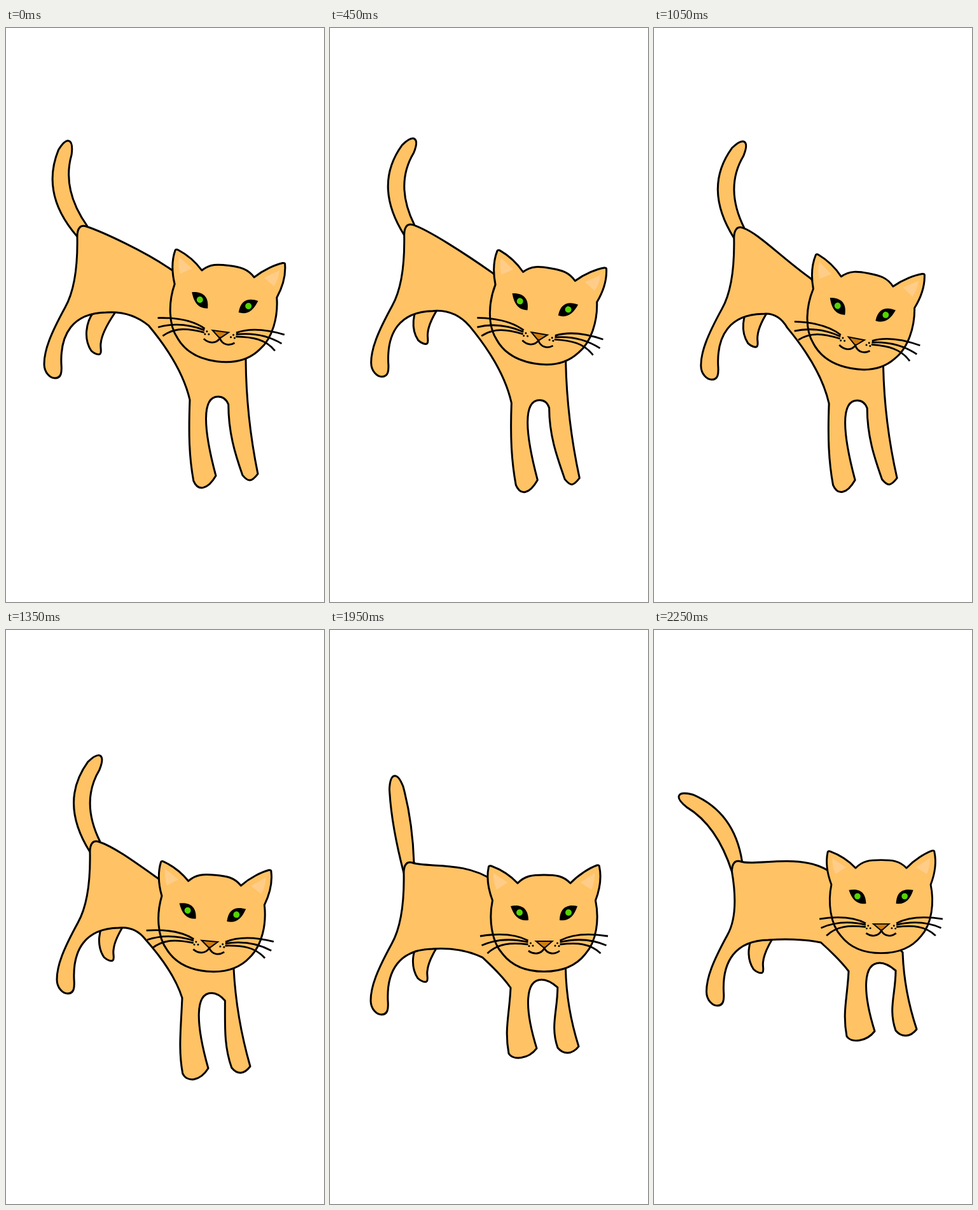
Write an HTML page that moves like this. It is 500 by 900 pixels and loops after 8 s.

```html
<!DOCTYPE html>
<html lang="en">
<head>
<meta charset="utf-8">
<title>Cat</title>
<style>
  html, body { margin: 0; width: 100%; height: 100%; overflow: hidden; background: #fff; }
  svg { display: block; width: 100%; height: 100%; }
  .fur { fill: #ffc264; stroke: #000; stroke-width: 3; stroke-linejoin: round; }
  .line { fill: none; stroke: #000; stroke-width: 2.8; }
</style>
</head>
<body>
<svg viewBox="0 0 500 900">
  <defs>
    <g id="side">
      <path d="M79.5-62L57-47 74.5-36Q80-48 79.5-62Z" fill="#ffcd88"/>
      <path d="M52.5-10C38-13 25-9 24.500 12C39 14 47 6 52.500-10Z"/>
      <circle cx="38.500" cy="0" r="5" fill="#55d400"/>
      <circle cx="21" cy="48" r="1.500"/>
      <circle cx="17.500" cy="52" r="1.500"/>
      <circle cx="23.500" cy="52.500" r="1.500"/>
      <path class="line" d="M25 44C48 32 75 33 100.500 37M25 46.500C52 40 76 42 98 51.500M25 50C52 47 72 48 89 64"/>
    </g>
  </defs>
  <g id="cat">
    <path id="tail" class="fur"/>
    <path id="farLeg" class="fur" d="M138 445C125 462 122 488 134 506C139 511 146 513 148 511C151 508 148 502 149 495C150 482 158 466 171 447L171 430 150 430Z"/>
    <path id="body" class="fur"/>
    <g id="head">
      <path class="fur" d="M-81-19C-89-40-90-58-87-72Q-86-74-83-73C-72-69-55-60-41.500-46C-30-58-18-59 0-59C18-59 30-58 41.500-46C55-60 72-70 83-74Q87-75 87-72C90-58 89-40 81-19C87 10 83 45 65 65C50 84 28 92.500 0 92.500C-28 92.500-50 84-65 65C-83 45-87 10-81-19Z"/>
      <use href="#side"/>
      <use href="#side" transform="scale(-1 1)"/>
      <path d="M-12.500 45H13L.5 56Z" fill="#d07c0c" stroke="#000" stroke-width="2"/>
      <path class="line" d="M-24.500 60C-16 66-5 66 .5 56C6 66 17 66 24.500 60"/>
    </g>
  </g>
</svg>
<script>
const LOOP = 8000, STEP = 150;

// hip: shift of the hindquarters; chest: front of the armpit; head: point between the eyes;
// turn and sway in degrees; curl: sideways bow of the tail; sit: sinking of the rump
const POSES = [
  { step: 0, ease: 1, hip: [0, 0], chest: [289, 583], head: [343, 431], turn: 7.5, sway: 12.5, curl: 35, sit: 0 },
  { step: 2, ease: 1, hip: [2, 1], chest: [291, 584], head: [341, 431], turn: 7.5, sway: 1, curl: 39, sit: 0 },
  { step: 5, ease: 1, hip: [10, -9], chest: [274, 596], head: [328, 442.5], turn: 14.2, sway: 1, curl: 39, sit: 0 },
  { step: 9, ease: 1.4, hip: [20, 21], chest: [277, 577], head: [324, 443], turn: 5, sway: 1, curl: 39, sit: 0 },
  { step: 11, ease: 1, hip: [10, 35], chest: [276, 571], head: [334.5, 445], turn: 4, sway: 5, curl: 41, sit: 0 },
  { step: 13, ease: 1, hip: [4, 54], chest: [284, 561], head: [336.5, 443], turn: 0, sway: 9, curl: 0, sit: 0 },
  { step: 15, ease: .36, hip: [22.5, 40], chest: [306, 535], head: [357, 417.5], turn: 0, sway: 36, curl: -29, sit: 12 }
];
const LAST = POSES[POSES.length - 1].step;

const el = id => document.getElementById(id);
const shape = (id, d) => el(id).setAttribute('d', d);
const place = (id, transform) => el(id).setAttribute('transform', transform);
const mix = (a, b, k) => Array.isArray(a) ? a.map((v, i) => mix(v, b[i], k)) : a + (b - a) * k;
const smooth = k => k * k * (3 - 2 * k);
// Moves a point along a unit direction and to the right of it
const walk = ([x, y], [dx, dy], along, right) => [x + dx * along - dy * right, y + dy * along + dx * right];
const shifter = (dx, dy) => (...p) => p.map((v, i) => v + (i % 2 ? dy : dx));

function poseAt(step) {
  const i = Math.max(1, POSES.findIndex(p => p.step >= step));
  const a = POSES[i - 1], b = POSES[i];
  const k = ((step - a.step) / (b.step - a.step)) ** b.ease;
  return Object.fromEntries(Object.keys(a).map(key => [key, mix(a[key], b[key], k)]));
}

function tailPath({ hip: [x, y], sit, sway, curl }) {
  const rump = shifter(x - sit, y + sit);
  const angle = sway * Math.PI / 180, up = [-Math.sin(angle), -Math.cos(angle)];
  const root = rump(120, 318);
  const bend = walk(root, up, 70, -curl), end = walk(root, up, 126, 0);
  const length = Math.hypot(end[0] - bend[0], end[1] - bend[1]);
  const tip = end.map((v, i) => (v - bend[i]) / length);
  return [
    'M', rump(112, 327), 'Q', walk(bend, up, 0, -17), walk(end, tip, 0, -11),
    'Q', walk(end, tip, 19, -7), walk(end, tip, 19, 0),
    'Q', walk(end, tip, 19, 7), walk(end, tip, 0, 11),
    'Q', walk(bend, up, 0, 17), rump(128, 311)
  ].join(' ');
}

function bodyPath({ hip: [hx, hy], chest: [ax, ay], head, sit }) {
  const hind = shifter(hx, hy), rump = shifter(hx - sit, hy + sit);
  const chest = shifter(ax, ay), face = shifter(...head);
  // 0: standing level, 1: front stretched far down
  const stretch = smooth(Math.min(1, Math.max(0, (ay - hy - 495) / 110)));
  const leg = 94 + 28 * stretch;
  const width = 33 - 11 * stretch ** 2;
  const fold = 45 + 80 * stretch;
  const pad = 18 + 6 * stretch;
  const left = shifter(ax + 41, ay + leg), right = shifter(ax + 107, ay + leg - 3);
  const gap = shifter(ax + 49 - 5 * stretch, ay - 13 + 9 * stretch);
  const [sx, sy] = face(34, 88), [rx, ry] = right(0, 0);
  const [gx, gy] = gap(0, 0), [ix, iy] = gap(width - 8, 12);
  const [vx, vy] = chest(-30 - .3 * fold, -fold);
  return [
    'M', rump(112, 327), 'C', rump(112, 314, 117, 308, 126, 311),
    'C', rump(150, 319), face(-124, sit - 81, -80, sit - 50), 'L', sx, sy,
    'Q', (sx + rx) / 2 - 9, (sy + ry) / 2, rx, ry,
    // right front leg
    'C', right(-10, 13, 9 - width, 13, -width, 2),
    'C', right(-width - 12, -32), ix, mix(iy, ry, .4), ix, iy,
    'Q', gap(11, 0, 0, 0),
    // left front leg
    'C', gap(-26, 0), left(-20, .6 * (gy - ay - leg), 0, 0),
    'C', left(-13, pad - 1, -width - 4, pad + 1, -width - 11, 8),
    'C', left(-width - 18, -30), chest(-2, .45 * leg, 0, 0),
    // belly and hind leg
    'Q', (ax + vx) / 2 + .17 * fold, (ay + vy) / 2 + 4, vx, vy,
    'Q', (157 + hx + vx) / 2 + 5, hy + 443, hind(157, 446),
    'C', hind(105, 447, 85, 480, 87, 527),
    'C', hind(88, 540, 87, 549, 77, 549),
    'C', hind(70, 549, 60, 541, 60, 527),
    'C', hind(60, 505, 70, 480, 93, 438),
    'C', hind(106, 415, 113 - sit / 2, 380), rump(112, 327), 'Z'
  ].join(' ');
}

function draw(time) {
  const step = Math.min(Math.floor(time % LOOP / STEP), LAST);
  const pose = poseAt(step);
  // One quick flick of the tail to the left, the body leaning against it
  const flick = step === 1 ? 1 : 0;
  const tail = { ...pose, sway: mix(pose.sway, 30, flick), curl: mix(pose.curl, -14, flick) };
  place('cat', `translate(${7 * flick} ${-7 * flick})`);
  shape('tail', tailPath(tail));
  place('farLeg', `translate(${pose.hip[0]} ${pose.hip[1] - Math.min(14, 5 * step)})`);
  shape('body', bodyPath(pose));
  place('head', `translate(${pose.head}) rotate(${pose.turn}) scale(${1 - .003 * pose.sit})`);
}

const start = performance.now();
function tick() {
  draw(performance.now() - start);
  requestAnimationFrame(tick);
}
tick();
</script>
</body>
</html>
```
